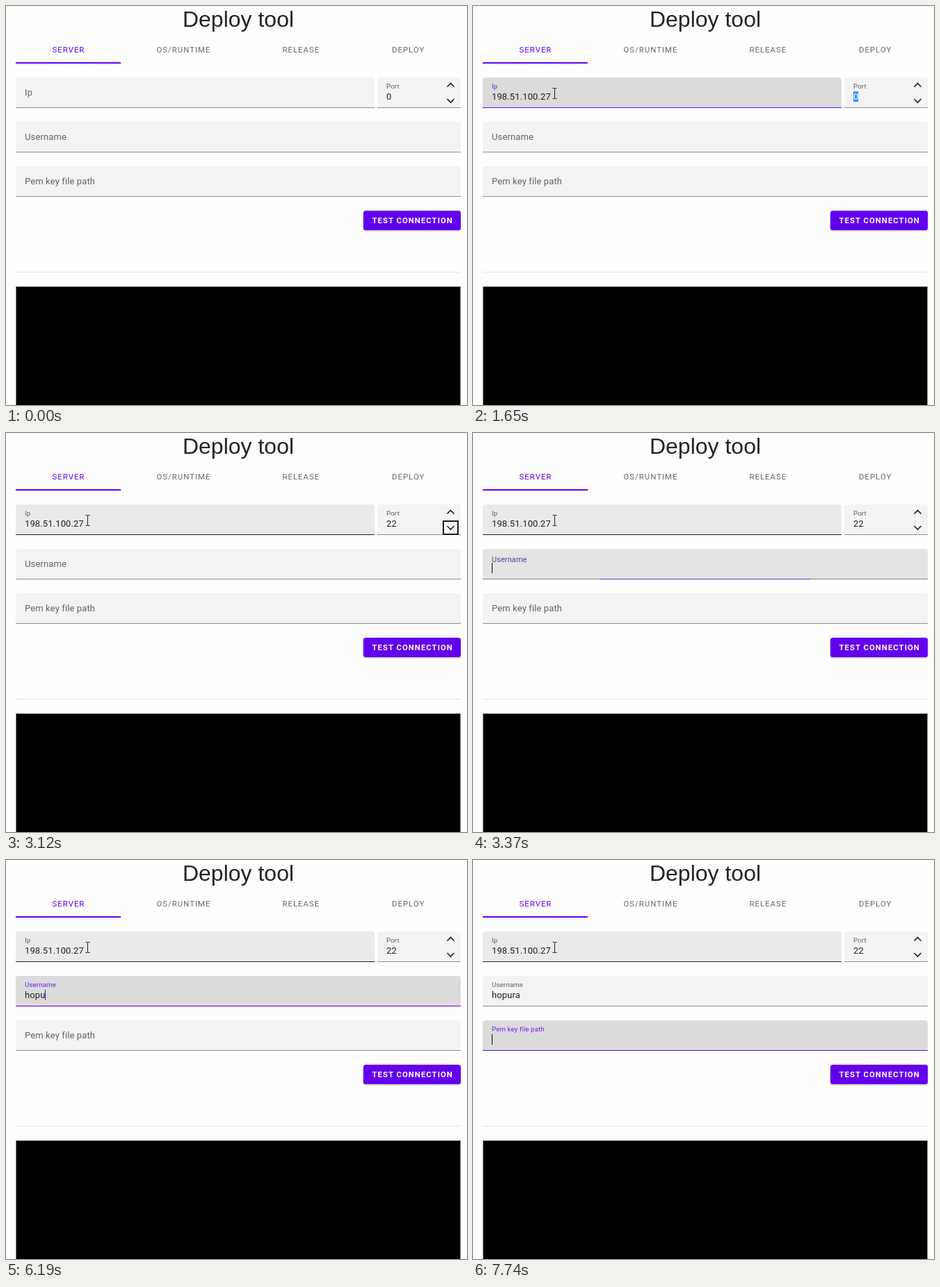
Write an HTML page that moves like this. It is 663x575 px and loops after 8 s.

```html
<!DOCTYPE html>
<html lang="en">
<head>
<meta charset="utf-8">
<title>Deploy tool</title>
<style>
  html, body { margin: 0; width: 100%; height: 100%; overflow: hidden; background: #fefefe; }
  svg { display: block; font: 13px Roboto, sans-serif; }
  rect { shape-rendering: crispEdges; }
  .title { font: 32px "Liberation Sans", Arial, sans-serif; fill: #212529; text-anchor: middle; }
  .caps { font-size: 11.375px; letter-spacing: .0892857em; fill: rgba(0,0,0,.6); }
  .active { fill: #6200ee; }
  .button { font-weight: 600; fill: #fff; }
  .face { fill: #6200ee; shape-rendering: auto; filter: drop-shadow(0 1px 1px rgba(0,0,0,.35)); }
  .label, .value { letter-spacing: .009375em; white-space: pre; }
  .stroke { fill: none; stroke: #1c1c1c; }
</style>
</head>
<body>
<svg id="stage" width="663" height="575" viewBox="0 0 663 575">
  <text class="title" x="334" y="30">Deploy tool</text>
  <g class="caps">
    <text class="active" x="66.5" y="67">SERVER</text>
    <text x="216.5" y="67">OS/RUNTIME</text>
    <text x="397.5" y="67">RELEASE</text>
    <text x="555" y="67">DEPLOY</text>
  </g>
  <rect class="active" x="14" y="81" width="151" height="2"/>
  <g id="fields"></g>
  <g class="stroke" stroke-width="1.6">
    <path d="M634.5 116.5l5-5l5 5M634.5 134l5 5l5-5"/>
    <rect id="ringUp" x="629" y="104" width="21" height="21" stroke-width="2"/>
    <rect id="ringDown" x="629" y="127" width="21" height="19" stroke-width="2"/>
  </g>
  <rect class="face" x="514" y="295" width="140" height="28" rx="3.5"/>
  <text class="caps button" x="526.5" y="313">TEST CONNECTION</text>
  <rect x="14" y="383" width="640" height="1" fill="#e4e4e4"/>
  <rect x="14" y="404" width="640" height="180" fill="#767676"/>
  <rect x="15" y="405" width="638" height="180"/>
  <path id="pointer" class="stroke" d="M-3 -7.5h2.5l.5 .5l.5 -.5h2.5M0 -7v14M-3 7.5h2.5l.5 -.5l.5 .5h2.5"/>
</svg>
<script>
const LOOP = 8000;
const NEVER = Infinity;
const $ = id => document.getElementById(id);

// focus: [start, end]; lead: how far the fade already is when it first shows
const fields = [
  { label: 'Ip', x: 14, y: 103, w: 516, focus: [1040, 1650], lead: 0, origin: 117,
    edits: [[1280, '198.51.100.27']] },
  { label: 'Port', x: 534, y: 103, w: 120, focus: [1650, 2690], lead: 0, blurLead: 60,
    edits: [[0, '0'], [2260, '2'], [2380, '22']], selected: [1650, 2260] },
  { label: 'Username', x: 14, y: 167, w: 640, focus: [3370, 7560], lead: 60,
    edits: [[4100, 'h'], [4470, 'ho'], [4590, 'hop'], [4890, 'hopm'], [5450, 'hop'], [5700, 'hop,'],
            [6010, 'hop'], [6190, 'hopu'], [6750, 'hopur'], [7000, 'hopura']] },
  { label: 'Pem key file path', x: 14, y: 231, w: 640, focus: [7560, NEVER], lead: 0, edits: [] }
];

function add(parent, tag, attrs = {}) {
  const el = document.createElementNS('http://www.w3.org/2000/svg', tag);
  set(el, attrs);
  parent.appendChild(el);
  return el;
}
function set(el, attrs) {
  for (const key in attrs) el.setAttribute(key, attrs[key]);
}
const show = (el, on) => el.setAttribute('visibility', on ? 'visible' : 'hidden');
const within = (t, [from, to]) => t >= from && t < to;
const clamp = v => Math.max(0, Math.min(1, v));

// cubic-bezier(.4, 0, .2, 1)
function ease(x) {
  let lo = 0, hi = 1;
  for (let i = 0; i < 16; i++) {
    const s = (lo + hi) / 2, r = 1 - s;
    if (1.2 * r * r * s + .6 * r * s * s + s * s * s < x) lo = s; else hi = s;
  }
  return lo * lo * (3 - 2 * lo);
}
const ramp = (t, start, lead, span) => t < start ? 0 : ease(clamp((t - start + lead) / span));

for (const f of fields) {
  const { x, y, w } = f, right = x + w, g = add($('fields'), 'g');
  const shape = `M${x} ${y + 44}V${y + 4}q0 -4 4 -4H${right - 4}q4 0 4 4V${y + 44}z`;
  f.textX = x + 13;
  add(g, 'path', { d: shape, fill: '#f3f3f3' });
  f.shade = add(g, 'path', { d: shape });
  f.line = add(g, 'rect', { x, y: y + 43, width: w, height: 1 });
  f.accent = add(g, 'rect', { y: y + 43, height: 1, fill: '#6200ee' });
  f.mark = add(g, 'rect', { x: f.textX, y: y + 20, width: 7, height: 15, fill: '#3390ff' });
  f.labelText = add(g, 'text', { class: 'label' });
  f.labelText.textContent = f.label;
  f.valueText = add(g, 'text', { class: 'value', x: f.textX, y: y + 32 });
  f.caret = add(g, 'rect', { y: y + 20, width: 1, height: 15 });
}

function pointerAt(t) {
  const p = ease(clamp((t - 440) / 540));
  return { x: 250 - 133 * p, y: 248 - 122 * p, visible: t >= 500 };
}

function drawField(f, t, pointer) {
  const [start, end] = f.focus;
  const blur = ramp(t, end, f.blurLead || 0, 150);
  const focus = ramp(t, start, f.lead, 150) * (1 - blur);
  const hover = pointer.visible && pointer.y >= f.y && pointer.y < f.y + 44 &&
    pointer.x >= f.x && pointer.x < f.x + f.w;
  const edit = f.edits.filter(e => e[0] <= t).pop();
  const value = edit ? edit[1] : '';
  const selected = !!f.selected && within(t, f.selected);

  set(f.shade, { 'fill-opacity': Math.max(hover ? .034 : 0, .098 * focus) });
  set(f.line, { 'fill-opacity': hover ? .87 : .42 });

  const grow = ramp(t, start, f.lead, 180);
  const origin = f.origin || f.x + f.w / 2;
  set(f.accent, { x: origin - (origin - f.x) * grow, width: f.w * grow, 'fill-opacity': focus });

  const lift = value ? 1 : focus;
  set(f.labelText, {
    transform: `translate(${f.textX} ${f.y + 26 - 10.5 * lift}) scale(${1 - .25 * lift})`,
    fill: `rgba(${98 * focus},0,${238 * focus},${.6 + .27 * focus})`
  });

  if (f.valueText.textContent !== value) f.valueText.textContent = value;
  set(f.valueText, { fill: selected ? '#fff' : 'rgba(0,0,0,.87)' });
  show(f.mark, selected);

  const since = t - Math.max(start, edit ? edit[0] : 0);
  const blinkOn = since % 1000 < 500;
  show(f.caret, within(t, f.focus) && !selected && blinkOn);
  const width = value ? f.valueText.getComputedTextLength() : 0;
  set(f.caret, { x: Math.floor(f.textX + width), fill: value ? '#6200ee' : '#000' });
}

function draw(t) {
  const pointer = pointerAt(t);
  for (const f of fields) drawField(f, t, pointer);
  show($('ringUp'), within(t, [2690, 3120]));
  show($('ringDown'), within(t, [3120, 3370]));
  show($('pointer'), pointer.visible);
  set($('pointer'), { transform: `translate(${Math.round(pointer.x) + .5} ${Math.round(pointer.y)})` });
}

const began = performance.now();
function tick() {
  draw((performance.now() - began) % LOOP);
  requestAnimationFrame(tick);
}
tick();
</script>
</body>
</html>
```
